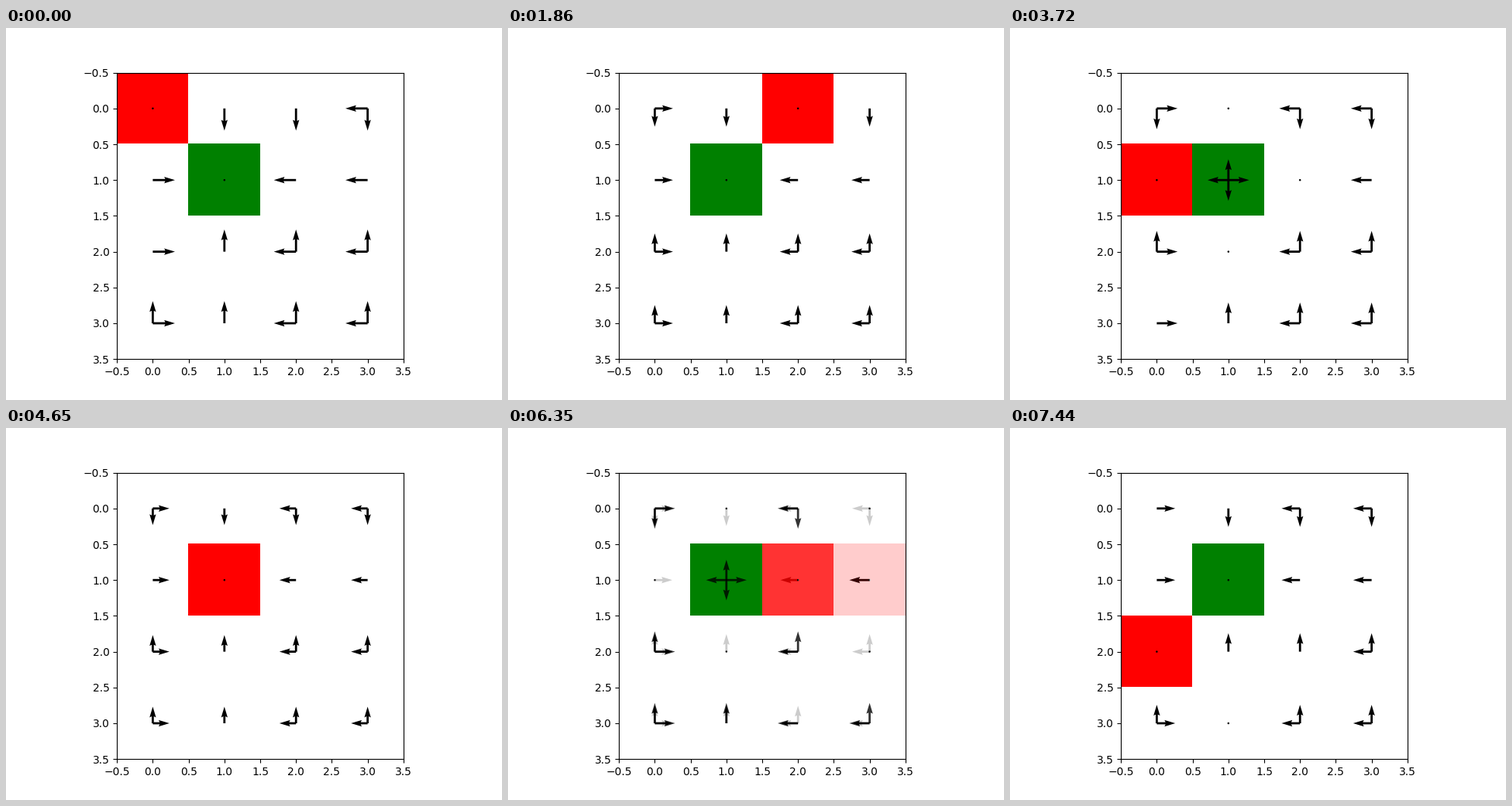
Write a matplotlib script that moves like this. It is 640x480 px and loops after 8 s.

```python
import numpy as np
import matplotlib.pyplot as plt
from matplotlib.animation import FuncAnimation

LOOP, STEP = 8000, 20               # ms
HOLD, FADE_STEP, FADES = 750, 20, 9
CYCLE = HOLD + FADE_STEP * FADES

GOAL = (1, 1)
VECTORS = {"u": (0, 1), "d": (0, -1), "l": (-1, 0), "r": (1, 0), ".": (0, 0)}

# Moves of each cell, row by row, unless a state overrides them.
DEFAULT = ["rd d ld ld", "r . l l", "ru u lu lu", "ru u lu lu"]

# Per state: red cell (x, y), arrow length in pixels, overrides by cell "xy".
NEAR_GOAL = {"10": ".", "01": ".", "21": ".", "12": ".", "11": "udlr"}
STATES = [
    ((0, 0), 28.6, {"20": "d", "02": "r"}),
    ((1, 0), 26.8, {**NEAR_GOAL, "30": "d"}),
    ((2, 0), 23.5, {"30": "d"}),
    ((3, 0), 22.5, {"32": "l"}),
    ((0, 1), 26.8, {**NEAR_GOAL, "03": "r"}),
    ((1, 1), 21.4, {}),
    ((2, 1), 26.2, {**NEAR_GOAL, "30": ".", "32": ".", "23": "l"}),
    ((3, 1), 22.6, {"20": "l", "22": "l", "33": "l"}),
    ((0, 2), 23.8, {"00": "r", "22": "u", "13": "."}),
]

fig = plt.figure(figsize=(6.4, 4.8), dpi=100)


def arrows(red, overrides):
    """Rows of x, y, u, v for every move of every cell."""
    rows = []
    for y, line in enumerate(DEFAULT):
        for x, moves in enumerate(line.split()):
            moves = overrides.get(f"{x}{y}", moves)
            if (x, y) == red:
                moves = "."
            rows += [(x, y, *VECTORS[m]) for m in moves]
    return np.array(rows, float).T


def render(red, length, overrides):
    """Draw one state and return the picture as float RGB."""
    fig.clear()
    ax = fig.add_subplot()
    cells = np.full((4, 4, 3), 255, np.uint8)
    cells[GOAL[1], GOAL[0]] = (0, 128, 0)
    cells[red[1], red[0]] = (255, 0, 0)
    ax.imshow(cells)
    ax.apply_aspect()
    ax.quiver(*arrows(red, overrides), scale=ax.bbox.width / length)
    fig.canvas.draw()
    return np.asarray(fig.canvas.buffer_rgba())[..., :3].astype(np.float32)


pictures = [render(*state) for state in STATES]

fig.clear()
stage = fig.add_axes([0, 0, 1, 1])
stage.axis("off")
view = stage.imshow(pictures[0].astype(np.uint8), aspect="auto",
                    interpolation="nearest")


def update(i):
    t = i * STEP + STEP // 2
    n, phase = divmod(t, CYCLE)
    k = max(0, (phase - HOLD) // FADE_STEP + 1)
    picture = pictures[n]
    if k:
        mix = k / (FADES + 1)
        picture = picture * (1 - mix) + pictures[n + 1] * mix
    view.set_data(np.round(picture).astype(np.uint8))
    return [view]


anim = FuncAnimation(fig, update, frames=LOOP // STEP, interval=STEP,
                     repeat=True, repeat_delay=0)
plt.show()
```
